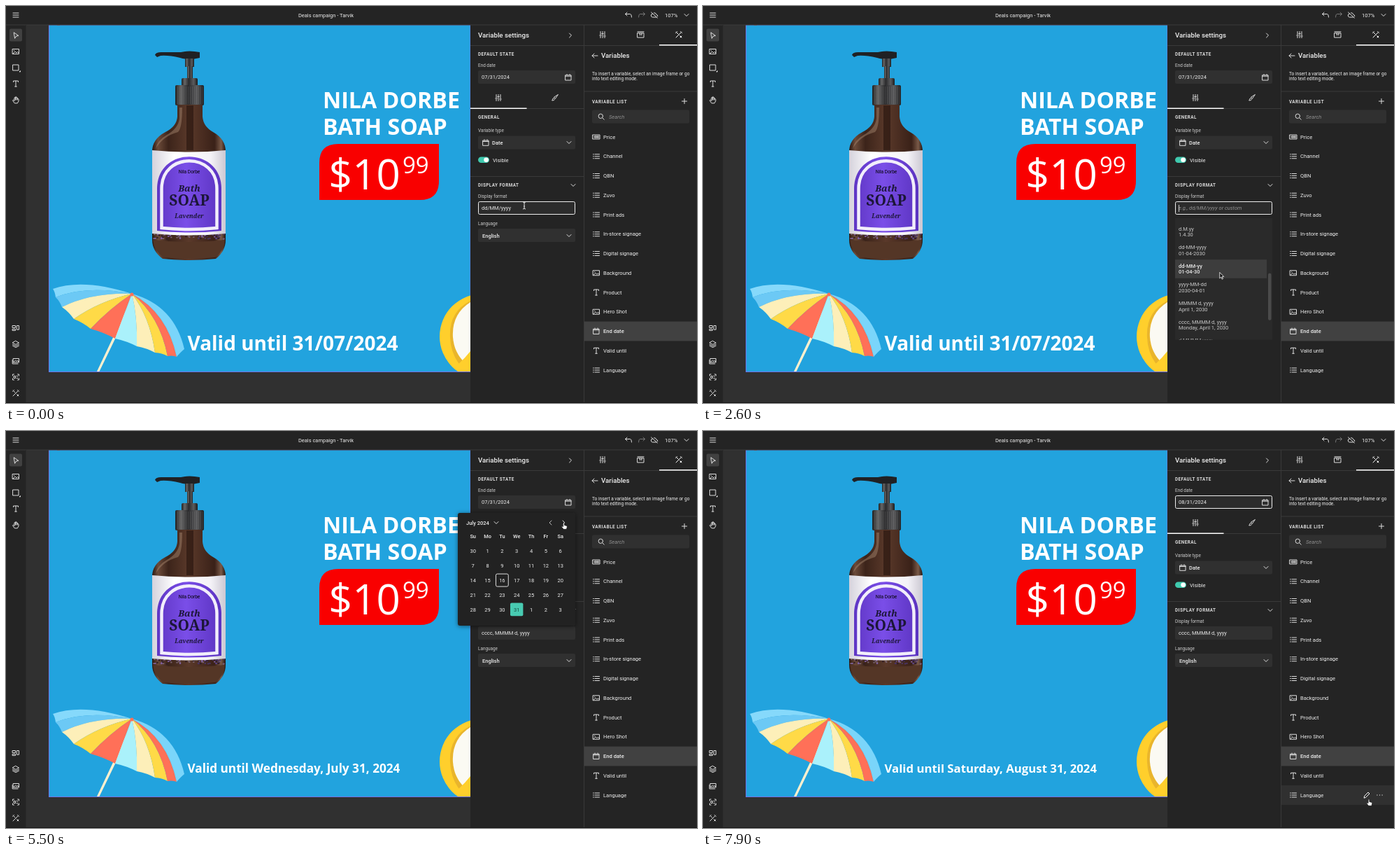
Write an HTML page that moves like this. It is 988 px wide and 567 px high and loops after 8 s.

```html
<!DOCTYPE html>
<html lang="en">
<head>
<title>Variable settings</title>
<style>
  html, body { margin: 0; width: 100%; height: 100%; overflow: hidden; background: #242424; }
  svg { display: block; font-family: Roboto, sans-serif; }
  #stage { width: 988px; height: 567px; }
  text { white-space: pre; }
  .ui { fill: #eee; }
  .dim { fill: #ccc; }
  .m { font-weight: 500; }
  .hint { fill: #8f8f8f; font-style: italic; }
  .cap { font-weight: 700; letter-spacing: .48px; fill: #ddd; }
  .mid { text-anchor: middle; }
  .big { font-family: "Open Sans", "Noto Sans", sans-serif; fill: #fff; }
  .b { font-weight: 700; }
  .serif { font-family: "Noto Serif", serif; font-weight: 700; fill: #1c1638; }
  .it { font-style: italic; }
  .ic { fill: none; stroke-width: 1; stroke-linejoin: round; stroke-linecap: round; }
</style>
</head>
<body>
<svg id="stage" viewBox="0 0 988 567">
  <defs>
    <linearGradient id="glass">
      <stop offset="0" stop-color="#2a1811"/><stop offset=".08" stop-color="#6b4a39"/>
      <stop offset=".22" stop-color="#3c241a"/><stop offset=".5" stop-color="#5a392a"/>
      <stop offset=".85" stop-color="#3a2118"/><stop offset=".94" stop-color="#7a5a48"/>
      <stop offset="1" stop-color="#24140e"/>
    </linearGradient>
    <linearGradient id="steel">
      <stop offset="0" stop-color="#222"/><stop offset=".2" stop-color="#666"/>
      <stop offset=".45" stop-color="#2b2b2d"/><stop offset=".75" stop-color="#5c5c5e"/>
      <stop offset="1" stop-color="#1b1b1c"/>
    </linearGradient>
    <linearGradient id="violet">
      <stop offset="0" stop-color="#5f36c4"/><stop offset=".45" stop-color="#7a4ee8"/>
      <stop offset="1" stop-color="#5b33c0"/>
    </linearGradient>
    <linearGradient id="paper">
      <stop offset="0" stop-color="#d5d2dc"/><stop offset=".3" stop-color="#fff"/>
      <stop offset=".8" stop-color="#f4f2f7"/><stop offset="1" stop-color="#cbc8d2"/>
    </linearGradient>
    <clipPath id="pageClip"><path d="M62 27H664V522H62z"/></clipPath>
    <filter id="shade" x="-20%" y="-20%" width="140%" height="140%">
      <feDropShadow dx="0" dy="1" stdDeviation="3" flood-opacity=".5"/>
    </filter>
  </defs>
  <g id="base"></g>
  <g id="live"></g>
</svg>
<script>
const LOOP = 8000;
const $ = id => document.getElementById(id);
const text = (x, y, s, size = 7.6, cls = 'ui') =>
  `<text x="${x}" y="${y}" font-size="${size}" class="${cls}">${s}</text>`;
const rect = (x, y, w, h, fill, r = 0, more = '') =>
  `<rect x="${x}" y="${y}" width="${w}" height="${h}" rx="${r}" fill="${fill}" ${more}/>`;
const path = (d, fill, more = '') => `<path d="${d}" fill="${fill}" ${more}/>`;
const field = (y, focus) => focus
  ? rect(675.5, y + .5, 138, 18, '#2c2c2c', 2, 'stroke="#eee"')
  : rect(675, y, 139, 19, '#303030', 2);

const ICONS = {
  menu: 'M-4-3H4M-4 0H4M-4 3H4',
  pointer: 'M-2.5-4L4 .5L.7 1L-1.2 4Z',
  image: 'M-4.5-3.5h9v7h-9zM-4 3L-1 0L1 2L2.5.5L4.5 2.5M-2.5-1.5h.3',
  shape: 'M-4-4h8v8h-8zM5.5 6h1v-1z',
  type: 'M-3.5-2.5V-4H3.5V-2.5M0-4V4M-1.3 4H1.3',
  hand: 'M-2 4.5L-4.5.8L-3.3 0L-2 1.5V-3Q-1.3-4-.6-3V-4Q.2-5 .9-4V-3Q1.6-4 2.3-3V-1.5Q3.5-2 4 -1V2L2.5 4.5ZM-.6-3V0M.9-3V0M2.3-1.5V0',
  blocks: 'M-4.5-3.5h4v3h-4zM-4.5 1.5h4v2h-4zM1.8-3.5h2.7V2.2h-2.7z',
  layers: 'M0-4.5L4.5-2L0 .5L-4.5-2ZM-4.5.2L0 2.7L4.5.2M-4.5 2.2L0 4.7L4.5 2.2',
  media: 'M-3.5-3.5h8v5.5h-8zM-4.8-1.5V4H3M-3 1.5L-.5-1L1 .5L2.5-.8L4 1',
  scan: 'M-4.5-2V-4H-2.5M2.5-4H4.5V-2M4.5 2V4H2.5M-2.5 4H-4.5V2M-2.5-1.5h2v3h-2zM1.2-1.5h1.6M1.2 1.5h1.6',
  tools: 'M-4 4L4-4M-4-4L-1-1M1.5 1.5L4 4M-4.5-2.5L-2.5-4.5M2 4L4 2M2.5-4.5L4.5-2.5',
  undo: 'M-2-4L-4.5-1.5L-2 1M-4.5-1.5H2.5Q4.5-1.5 4.5 3',
  redo: 'M2-4L4.5-1.5L2 1M4.5-1.5H-2.5Q-4.5-1.5-4.5 3',
  cloud: 'M-4.5-4L4.5 4M-2.5-2Q-5-1.5-4.7 1Q-4.2 3-2.5 3H3M-.5-3.3Q2.3-3.5 2.8-.8Q5-.5 4.8 1.6',
  down: 'M-3-1.5L0 1.5L3-1.5',
  right: 'M-1.5-3L1.5 0L-1.5 3',
  left: 'M1.5-3L-1.5 0L1.5 3',
  back: 'M4 0H-4M-1-3L-4 0L-1 3',
  plus: 'M-3.5 0H3.5M0-3.5V3.5',
  search: 'M1.8 1.8L4.2 4.2M2.5-.7A3.2 3.2 0 1 1-3.9-.7A3.2 3.2 0 1 1 2.5-.7',
  sliders: 'M-3-4.5V0M-3 2V4.5M0-4.5V-2.5M0-.5V4.5M3-4.5V1M3 3V4.5M-4.2 1H-1.8M-1.2-1.5H1.2M1.8 2H4.2',
  brush: 'M4.2-4.2L.5 1.2L-1.2-.5ZM-1.5 .5Q-3.5 .5-3.5 2.5L-4.3 4Q-1 4.5-.2 1.8',
  package: 'M-4.5-2.5h9v6.5h-9zM-4.5-4.3h9M-1.5-2.5v3L0-.3L1.5.5v-3',
  list: 'M-4.5-3h.8M-2-3H4.5M-4.5 0h.8M-2 0H4.5M-4.5 3h.8M-2 3H4.5',
  price: 'M-5-3H5V3H-5zM-3-1.3V1.3M-1-1.3h1.3v2.6h-1.3zM2-1.3h1.3v2.6h-1.3z',
  date: 'M-4-3.2H4V4H-4zM-4-1.8H4M-2-4.5v1M2-4.5v1',
  pencil: 'M-3.8 3.8L-3.2 1.3L2-4L4-2L-1.3 3.2Z',
  dots: 'M-3.7 0h.3M-.1 0h.3M3.5 0h.3'
};
const icon = (name, x, y, color = '#ddd', more = '') =>
  `<path class="ic" d="${ICONS[name]}" transform="translate(${x} ${y})" stroke="${color}" ${more}/>`;

// ---- artwork ----
function umbrella() {
  const ax = 180, ay = 411;
  const rim = [[67,404],[71,416],[80,430],[97,447],[121,461],[156,475],[187,486],[213,495],[231,500],[244,501],[255,490]];
  const colors = ['#86d9fb','#6cc9f5','#fdefb9','#ffda47','#ff7058','#aaf1fb','#fdefb9','#ffda47','#ff7058','#7ad5fa'];
  const ctrl = i => {
    const [x, y] = rim[i], s = Math.abs(i - 5) / 5;
    return [(ax + x) / 2 + (i < 5 ? -13 : 23) * s, (ay + y) / 2 - (i < 5 ? 19 : 23) * s];
  };
  let out = path('M176 425L129 524L132 525L179 428Z', '#fdf0cf');
  colors.forEach((c, i) => {
    const [p, q] = [rim[i], rim[i + 1]];
    const lift = [(p[0] + q[0]) / 2 + 1, (p[1] + q[1]) / 2 - 2];
    out += path(`M${ax} ${ay}Q${ctrl(i)} ${p}Q${lift} ${q}Q${ctrl(i + 1)} ${ax} ${ay}Z`, c);
  });
  return out + `<circle cx="180" cy="412" r="2.5" fill="#ff7058"/>`;
}

function bottle() {
  let out = path('M213 70Q214 66 222 66L250 66Q262 63 277 66V74Q262 78 249 74Q232 70 221 71L216 73Z', '#202124');
  out += rect(256, 75, 13, 12, 'url(#steel)') + rect(259, 86, 8, 19, 'url(#steel)');
  out += rect(251, 103, 23, 12, 'url(#steel)', 2) + rect(242, 113, 41, 29, 'url(#steel)', 2);
  for (let x = 245; x < 282; x += 3) out += rect(x, 115, .6, 25, '#777', 0, 'opacity=".5"');
  out += path('M245 141H281V158Q282 172 296 180Q314 190 314 208V334Q314 350 300 361Q262 365 224 361Q209 350 209 334V208Q209 190 228 180Q244 172 245 158Z', 'url(#glass)');
  out += rect(258, 142, 10, 64, '#2b1710', 0, 'opacity=".7"');
  out += path('M248 145V161Q246 175 230 184Q216 192 214 204Q224 186 246 180Q252 174 252 145Z', '#a98a72', 'opacity=".45"');
  out += path('M210 334Q262 340 313 334Q312 350 299 359Q262 363 225 359Q212 350 210 334Z', '#543626');
  let seed = 7;
  const rnd = () => (seed = seed * 16807 % 2147483647) / 2147483647;
  for (let i = 0; i < 90; i++)
    out += rect(210 + rnd() * 101, 323 + rnd() * 9, 2.4, 1.8, ['#4a3568', '#8060a8', '#2d1b25', '#78616a'][i % 4]);
  out += path('M209 206Q262 211 314 206V325Q262 330 209 325Z', 'url(#paper)');
  out += path('M216 321V261C216 200 308 200 308 261V321Q262 326 216 321Z', 'url(#violet)');
  out += path('M222.5 317V261C222.5 208 301.5 208 301.5 261V317Q262 321 222.5 317Z', 'none', 'stroke="#f2eefb" stroke-width="4.5"');
  out += text(262, 239, 'Nila Dorbe', 6.6, 'mid');
  out += text(262, 265, 'Bath', 13, 'serif it mid') + text(262, 285, 'SOAP', 21, 'serif mid');
  return out + text(262, 303, 'Lavender', 8.5, 'serif it mid');
}

function page() {
  let out = rect(61.5, 27, 602.5, 495.5, '#22a3de', 0, 'stroke="#6f75e8"') + `<g clip-path="url(#pageClip)">`;
  out += rect(73, 27, 4, 1, '#8b6b82') + bottle() + umbrella();
  out += `<circle cx="681" cy="472" r="61" fill="#ffcf2c"/>`;
  out += path('M664 421Q633 437 635 473Q636 503 658 522H690V421Z', '#e9b52c');
  out += path('M664 423Q637 440 639 473Q641 500 664 516Z', '#fbfaf3');
  out += path('M664 493Q653 507 640 517L664 523Z', '#ffcf2c') + '</g>';
  out += text(453, 146, 'NILA DORBE', 32.2, 'big b') + text(453, 184, 'BATH SOAP', 32.2, 'big b');
  out += path('M475 197H619V250Q619 277 592 277H448V224Q448 197 475 197Z', '#f90000');
  return out + text(461, 262, '$10', 60, 'big') + text(567, 239, '99', 33, 'big');
}

function chrome() {
  const line = (x, y, w) => rect(x, y, w, 1, '#3a3a3a');
  let out = rect(0, 0, 988, 567, '#303030') + page();
  out += rect(0, 0, 988, 27, '#242424') + rect(0, 27, 28, 540, '#242424') + rect(664, 27, 324, 540, '#242424');
  out += line(0, 26.5, 988) + rect(28, 27, 1, 540, '#292929') + rect(826, 27, 1, 540, '#3a3a3a');
  out += icon('menu', 14, 13) + text(457.5, 15.6, 'Deals campaign - Tarvik', 7.5, 'ui mid');
  out += icon('undo', 890, 13) + icon('redo', 909, 13, '#777') + icon('cloud', 927, 13);
  out += text(942, 15.8, '107%', 7.6) + icon('down', 973, 13);
  out += rect(5, 32.5, 18, 18, '#414141', 2);
  [['pointer', 42], ['image', 65], ['shape', 88], ['type', 111], ['hand', 134], ['blocks', 460],
   ['layers', 483], ['media', 507], ['scan', 530], ['tools', 553]].forEach(([n, y]) => out += icon(n, 14, y));

  out += text(675, 45, 'Variable settings', 9.7, 'ui m') + icon('right', 807, 42) + line(664, 56, 162);
  out += text(675, 70.7, 'DEFAULT STATE', 6.3, 'cap') + text(675, 87, 'End date', 6.4, 'dim');
  out += icon('sliders', 704, 131) + icon('brush', 785, 131) + line(664, 146, 162) + rect(664, 145.5, 80.5, 1.5, '#fff');
  out += text(675, 160.5, 'GENERAL', 6.3, 'cap') + text(675, 179.7, 'Variable type', 6.4, 'dim');
  out += field(185.5) + icon('date', 686, 195.3) + text(695, 198, 'Date', 7.5, 'ui m') + icon('down', 805, 195);
  out += rect(675, 215.5, 16, 8.6, '#3fc9ae', 4.3) + `<circle cx="686.6" cy="219.8" r="3.3" fill="#fff"/>`;
  out += text(696, 222.5, 'Visible', 7.6) + line(664, 243, 162);
  out += text(675, 257.8, 'DISPLAY FORMAT', 6.3, 'cap') + icon('down', 811, 256);
  out += text(675, 274, 'Display format', 6.4, 'dim') + text(675, 312.7, 'Language', 6.4, 'dim');
  out += field(318) + text(681, 330.6, 'English', 7.5, 'ui m') + icon('down', 805, 328);

  out += icon('sliders', 853, 41) + icon('package', 907.5, 41) + icon('tools', 962, 41, '#fff', 'stroke-width="1.5"');
  out += line(827, 56, 161) + rect(934, 55, 54, 1.5, '#fff');
  out += icon('back', 842, 71) + text(851, 74, 'Variables', 9.7, 'ui m');
  out += text(838, 98.7, 'To insert a variable, select an image frame or go', 6.55);
  out += text(838, 106.4, 'into text editing mode.', 6.55) + line(827, 121.5, 161);
  out += text(838, 138.6, 'VARIABLE LIST', 6.3, 'cap') + icon('plus', 970, 136);
  out += rect(838, 148.5, 139, 19, '#303030', 2) + icon('search', 851, 158) + text(862, 160.7, 'Search', 7.5, 'hint');
  return out + rect(0, 566, 988, 1, '#151515');
}

// ---- moving parts ----
const ROWS = ['price Price', 'list Channel', 'list QBN', 'list Zuvo', 'list Print ads', 'list In-store signage',
  'list Digital signage', 'image Background', 'type Product', 'image Hero Shot', 'date End date', 'type Valid until', 'list Language'];
const FORMATS = ['MM/dd/yyyy|04/01/2030', 'MM/dd/yy|04/01/30', 'M/d/yy|4/1/30', 'dd/MM/yyyy|01/04/2030', 'dd/MM/yy|01/04/30',
  'd/M/yy|1/4/30', 'dd.MM.yyyy|01.04.2030', 'dd.MM.yy|01.04.30', 'd.M.yy|1.4.30', 'dd-MM-yyyy|01-04-2030', 'dd-MM-yy|01-04-30',
  'yyyy-MM-dd|2030-04-01', 'MMMM d, yyyy|April 1, 2030', 'cccc, MMMM d, yyyy|Monday, April 1, 2030', 'd MMMM yyyy|1 April 2030',
  'cccc d MMMM yyyy|Monday 1 April 2030', 'ccc, MMM d|Mon, Apr 1'];
const PITCH = 26.6, MAX_SCROLL = 279;
const PATH = [[0, 741, 285], [900, 741, 285], [1900, 741, 373], [2200, 741, 373], [2800, 738, 383], [3600, 738, 383],
  [4100, 767, 112], [4200, 803, 101], [4800, 803, 101], [5100, 797.5, 131], [5750, 797.5, 131], [6200, 794.5, 255],
  [6900, 794.5, 255], [7700, 951, 525], [7800, 951, 525], [7900, 952, 526], [LOOP, 952, 526]];
const CLICKS = [400, 2900, 4400, 5580, 6580];

const ease = (a, b, t) => {
  const u = Math.min(1, Math.max(0, (t - a) / (b - a)));
  return u * u * (3 - 2 * u);
};
function cursorAt(t) {
  const i = PATH.findIndex(k => k[0] > t), [a, b] = [PATH[i - 1], PATH[i]], u = ease(a[0], b[0], t);
  return [a[1] + (b[1] - a[1]) * u, a[2] + (b[2] - a[2]) * u];
}

function list(x, y) {
  return ROWS.map((row, i) => {
    const cy = 187 + 27.75 * i, [, kind, name] = row.match(/(\S+) (.*)/);
    const chosen = i === 10, hover = x > 827 && Math.abs(y - cy) < 13.9;
    return (chosen || hover ? rect(827, cy - 13.9, 161, 27.8, chosen ? '#414141' : '#303030') : '') +
      icon(kind, 844, cy, '#ddd') + text(854, cy + 2.6, name, 7.6, chosen ? 'ui m' : 'ui') +
      (hover ? icon('pencil', 949, cy, '#fff') + icon('dots', 967.5, cy, '#fff', 'stroke-width="2"') : '');
  }).join('');
}

function dropdown(t, y) {
  const scroll = MAX_SCROLL * ease(2200, 2800, t), hover = Math.floor((y - 303.5 + scroll) / PITCH);
  let out = rect(675, 303, 139, 173.5, '#2a2a2a');
  out += `<svg x="675" y="303.5" width="132" height="173" viewBox="675 303.5 132 173">`;
  FORMATS.forEach((f, i) => {
    const top = 303.5 + PITCH * i - scroll, cls = i === hover ? 'ui m' : 'dim', [a, b] = f.split('|');
    if (i === hover) out += rect(675, top, 131, PITCH, '#3d3d3d');
    out += text(680, top + 11.6, a, 7.5, cls) + text(680, top + 20.2, b, 7.5, cls);
  });
  return out + '</svg>' + rect(808, 305 + scroll * .37, 4.5, 67, '#4b4b4b', 2);
}

function calendar(august, x, y) {
  let out = rect(646, 117, 168, 161, '#232323', 3, 'filter="url(#shade)"');
  out += text(658, 133.6, august ? 'August 2024' : 'July 2024', 7.5, 'ui m') + icon('down', august ? 711 : 701, 131);
  out += icon('left', 778.5, 131, '#bbb') + icon('right', 797.5, 131, '#ddd');
  'Su Mo Tu We Th Fr Sa'.split(' ').forEach((d, i) => out += text(667.7 + 20.83 * i, 153, d, 7.4, 'ui m mid'));
  for (let i = 0; i < 35; i++) {
    const day = new Date(2024, august ? 6 : 5, (august ? 28 : 30) + i);
    const cx = 667.7 + 20.83 * (i % 7), cy = 171.3 + 20.9 * Math.floor(i / 7);
    const july = day.getMonth() === 6, n = day.getDate();
    const chosen = july && n === 31;
    if (chosen) out += rect(cx - 9.2, cy - 9.4, 18.4, 18.8, '#48cbb2', 2);
    else if (july && n === 16) out += rect(cx - 8.9, cy - 9, 17.8, 18, 'none', 2, 'stroke="#ddd"');
    else if (Math.abs(x - cx) < 9.5 && Math.abs(y - cy) < 9.5) out += rect(cx - 9.2, cy - 9.4, 18.4, 18.8, '#383838', 2);
    out += `<text x="${cx}" y="${cy + 2.6}" font-size="7.5" class="mid" fill="${chosen ? '#14463c' : '#eee'}">${n}</text>`;
  }
  return out;
}

function cursor(x, y, kind) {
  const shape = {
    beam: `<path d="M-2-5Q0-5 0-3.5Q0-5 2-5M0-4V4M-2 5Q0 5 0 3.5Q0 5 2 5M-1 1H1" fill="none" stroke="#ddd" stroke-width="1"/>`,
    arrow: path('M0 0V8.5L2 6.7L3.4 9.8L4.7 9.2L3.3 6.2H6Z', '#111', 'stroke="#fff" stroke-width=".8"'),
    hand: path('M-.9 5.5V.4Q0-.8 .9 .4V3.5L4.3 4.4Q5 4.8 4.8 6L4 9.3H-.4L-3.2 5.8Q-3 4.4-1.8 5.2Z', '#fff', 'stroke="#111" stroke-width=".7"')
  };
  return `<g transform="translate(${x} ${y})">${shape[kind]}</g>`;
}

function banner(t) {
  if (t < 3400) return text(259.5, 492, 'Valid until 31/07/2024', 28, 'big b');
  return t < 6800 ? text(259.5, 487.5, 'Valid until Wednesday, July 31, 2024', 17.2, 'big b')
    : text(259.5, 487.5, 'Valid until Saturday, August 31, 2024', 16.8, 'big b');
}

function scene(t) {
  const [x, y] = cursorAt(t), open = t >= 500 && t < 3150, picker = t >= 4450 && t < 6700;
  let out = banner(t) + list(x, y);
  out += field(92, t >= 6700) + text(680, 104.3, t < 6700 ? '07/31/2024' : '08/31/2024', 7.5) + icon('date', 804, 102, '#ddd');
  out += field(279, t < 3150);
  if (t < 400) out += text(680, 291.4, 'dd/MM/yyyy', 7.5);
  else if (t < 3300) out += text(680, 291.4, 'e.g., dd/MM/yyyy or custom', 7.5, 'hint');
  else out += text(680, 291.4, 'cccc, MMMM d, yyyy', 7.5);
  if (t >= 400 && t < 3150) out += rect(680, 284, .8, 10, '#eee');
  if (open) out += dropdown(t, y);
  if (picker) out += calendar(t >= 5650, x, y);
  if (CLICKS.some(c => t >= c && t < c + 130))
    out += `<circle cx="${x}" cy="${y + .5}" r="17" fill="#888" fill-opacity=".15" stroke="#aaa" stroke-width="1.2"/>`;
  const kind = y > 279 && y < 298 && x < 814 && t < 2000 ? 'beam'
    : picker && y > 115 || x > 827 ? 'hand' : 'arrow';
  return out + cursor(x, y, kind);
}

$('base').innerHTML = chrome();
let last = '';
function tick() {
  const next = scene(performance.now() % LOOP);
  if (next !== last) $('live').innerHTML = last = next;
  requestAnimationFrame(tick);
}
tick();
</script>
</body>
</html>
```
